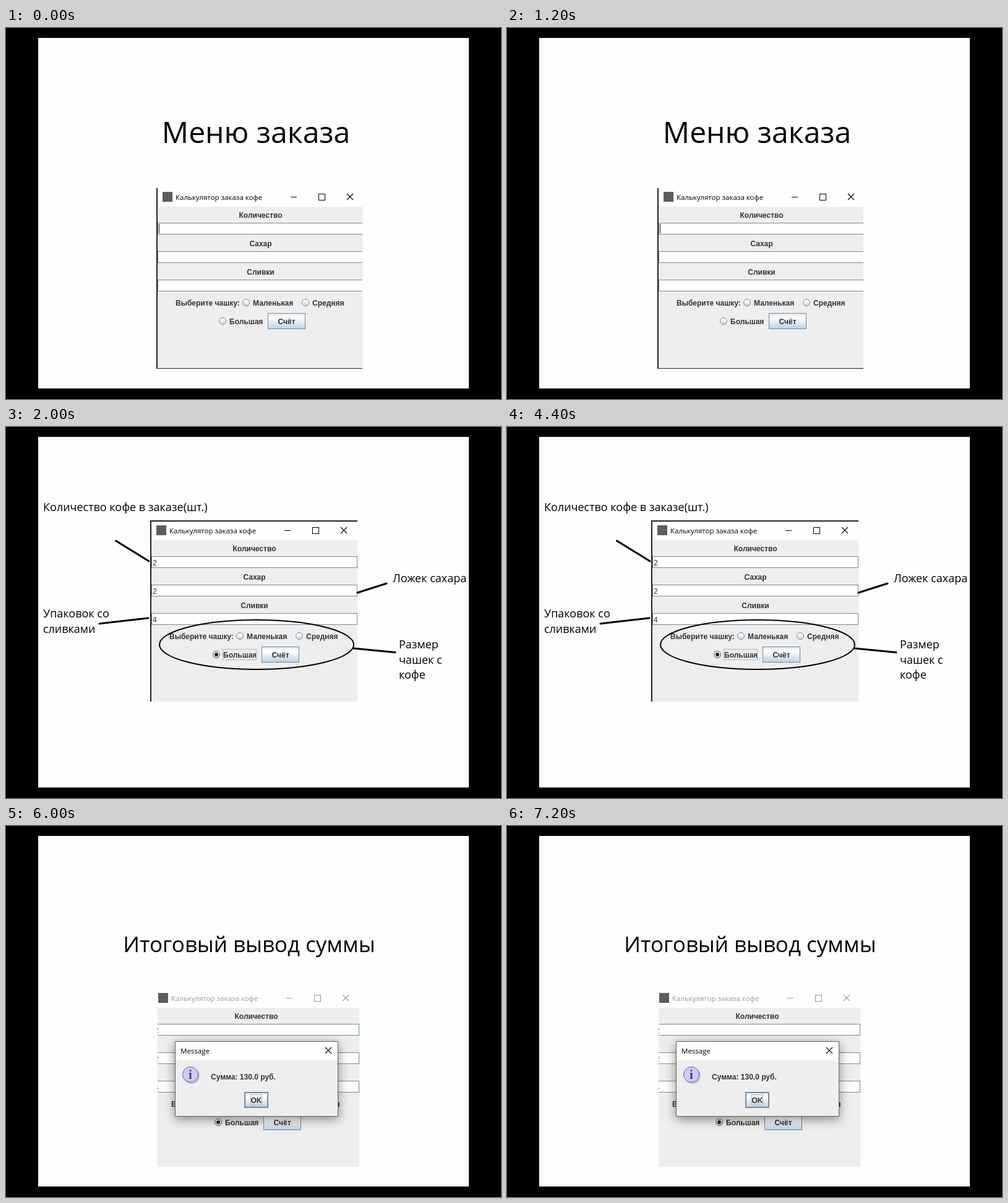
Animation of 800x600 px, one loop 8 s. Source, as an HTML page with a canvas:

```html
<!DOCTYPE html>
<html lang="ru">
<head>
<meta charset="utf-8">
<style>
  html, body { margin: 0; width: 100%; height: 100%; overflow: hidden; background: #000; }
  canvas { display: block; }
</style>
</head>
<body>
<canvas id="stage" width="800" height="600"></canvas>
<script>
const ctx = document.getElementById('stage').getContext('2d');
const LOOP = 8000;
const PAPER = '#fdfffc', PANEL = '#eeeeee', INK = '#333333', EDGE = '#7a8a99';
const sans = size => `${size}px "Open Sans", sans-serif`;
const bold = 'bold 12px "Liberation Sans", Arial, sans-serif';

function box(x, y, w, h, color) {
  ctx.fillStyle = color;
  ctx.fillRect(x, y, w, h);
}

function frame(x, y, w, h, color, width = 1) {
  ctx.strokeStyle = color;
  ctx.lineWidth = width;
  ctx.strokeRect(x + width / 2, y + width / 2, w - width, h - width);
}

function text(str, x, y, font, color = '#000', align = 'left') {
  ctx.font = font;
  ctx.fillStyle = color;
  ctx.textAlign = align;
  ctx.fillText(str, x, y);
}

function line(x1, y1, x2, y2, width = 1, color = '#000') {
  ctx.strokeStyle = color;
  ctx.lineWidth = width;
  ctx.beginPath();
  ctx.moveTo(x1, y1);
  ctx.lineTo(x2, y2);
  ctx.stroke();
}

function disc(x, y, r, fill, stroke) {
  ctx.beginPath();
  ctx.arc(x, y, r, 0, 2 * Math.PI);
  ctx.fillStyle = fill;
  ctx.fill();
  if (stroke) {
    ctx.strokeStyle = stroke;
    ctx.lineWidth = 1;
    ctx.stroke();
  }
}

function steel(y, h) {
  const g = ctx.createLinearGradient(0, y, 0, y + h);
  g.addColorStop(0, '#dde8f3');
  g.addColorStop(0.3, '#ffffff');
  g.addColorStop(1, '#b8cfe5');
  return g;
}

function cross(x, y, color) {
  line(x - 5, y - 5, x + 5, y + 5, 1.1, color);
  line(x - 5, y + 5, x + 5, y - 5, 1.1, color);
}

function radio(x, y, label, on) {
  disc(x, y, 5.5, steel(y - 6, 12), on ? '#4c5560' : EDGE);
  if (on) disc(x, y, 3, '#222');
  text(label, x + 11, y + 5, bold, INK);
}

function button(x, y, w, h, border = 1) {
  box(x, y, w, h, steel(y, h));
  frame(x, y, w, h, EDGE, border);
}

// Order form, shifted by (dx, dy) and cropped to the given screen box.
function orderForm(dx, dy, [left, top, right, bottom], { values = [], colors = [], big, focus, faded, caret } = {}) {
  const ink = faded ? '#999' : '#000';
  ctx.save();
  ctx.beginPath();
  ctx.rect(left, top, right - left, bottom - top);
  ctx.clip();
  ctx.translate(dx, dy);
  box(245, 259, 340, 30, PAPER);
  box(245, 289, 340, 270, PANEL);

  box(253, 265, 16, 16, '#5c5c62');
  text('Калькулятор заказа кофе', 274, 278, sans(11.5), ink);
  line(460, 273.5, 470, 273.5, 1, ink);
  frame(505, 268, 11, 11, ink);
  cross(556, 273, ink);

  ['Количество', 'Сахар', 'Сливки'].forEach((label, i) => {
    const y = 315 + 46 * i;
    text(label, 411.5, y - 8, bold, INK, 'center');
    box(245, y, 333, 19, PAPER);
    frame(245, y, 333, 19, EDGE);
    if (values[i]) text(values[i], 247, y + 15, '12px "Liberation Sans", Arial, sans-serif', colors[i]);
  });
  if (caret) box(247, 317, 1, 15, '#222');

  text('Выберите чашку:', 274, 449, bold, INK);
  radio(388, 444, 'Маленькая');
  radio(484, 444, 'Средняя');
  radio(350, 474, 'Большая', big);
  if (focus) frame(360, 465, 55, 18, '#a9b9cf');
  button(423, 461, 61, 26);
  text('Счёт', 453.5, 479, bold, INK, 'center');
  ctx.restore();
}

function menuScene() {
  text('Меню заказа', 404, 186, sans(48), '#000', 'center');
  orderForm(0, 0, [243, 259, 576, 551], { caret: true });
  box(243, 259, 2, 292, '#222');
  box(243, 550, 333, 1, '#222');
}

function notesScene() {
  orderForm(-10, -106, [233, 151, 568, 444], {
    values: ['2', '2', '4'], colors: ['#55202a', '#55202a', '#333'], big: true, focus: true
  });
  box(233, 151, 2, 293, '#222');
  box(233, 151, 335, 2, '#222');

  const note = sans(18);
  text('Количество кофе в заказе(шт.)', 60, 136, note);
  text('Ложек сахара', 625, 251, note);
  text('Упаковок со', 60, 308, note);
  text('сливками', 60, 333, note);
  text('Размер', 635, 358, note);
  text('чашек с', 635, 383, note);
  text('кофе', 635, 407, note);

  ctx.lineCap = 'round';
  line(177.5, 184, 231, 217, 3);
  line(568, 268, 615, 253, 3);
  line(151, 318, 230, 309, 3);
  line(562, 358, 629, 364.5, 3);
  ctx.lineCap = 'butt';
  ctx.lineWidth = 2;
  ctx.beginPath();
  ctx.ellipse(405, 352, 157, 40, 0, 0, 2 * Math.PI);
  ctx.stroke();
}

function messageDialog() {
  ctx.save();
  ctx.shadowColor = 'rgba(0,0,0,.45)';
  ctx.shadowBlur = 16;
  ctx.shadowOffsetY = 4;
  box(273, 348, 264, 122, PANEL);
  ctx.restore();
  box(274, 349, 262, 30, PAPER);
  frame(273, 348, 264, 122, '#666');
  text('Message', 282, 368, sans(11.5));
  cross(521, 363, '#000');

  disc(300, 404, 13, '#c4c4c8');
  disc(298, 402, 12.5, '#ccccff', '#666699');
  text('i', 298, 409, 'bold 21px "Liberation Serif", serif', '#44446e', 'center');
  text('Сумма: 130.0 руб.', 331, 410, bold, INK);
  button(385, 430, 39, 26, 2);
  frame(395, 434, 19, 18, '#a3b8cc');
  text('OK', 404.5, 448, bold, INK, 'center');
}

function totalScene() {
  text('Итоговый вывод суммы', 393, 204, sans(35), '#000', 'center');
  orderForm(-7, 5, [245, 264, 571, 551], {
    values: ['2', '2', '4'], colors: Array(3).fill('#40506a'), big: true, faded: true
  });
  messageDialog();
}

function draw() {
  const t = performance.now() % LOOP;
  box(0, 0, 800, 600, '#000');
  box(52, 16, 696, 567, PAPER);
  if (t < 2000) menuScene();
  else if (t < 6000) notesScene();
  else totalScene();
  requestAnimationFrame(draw);
}
draw();
</script>
</body>
</html>
```
